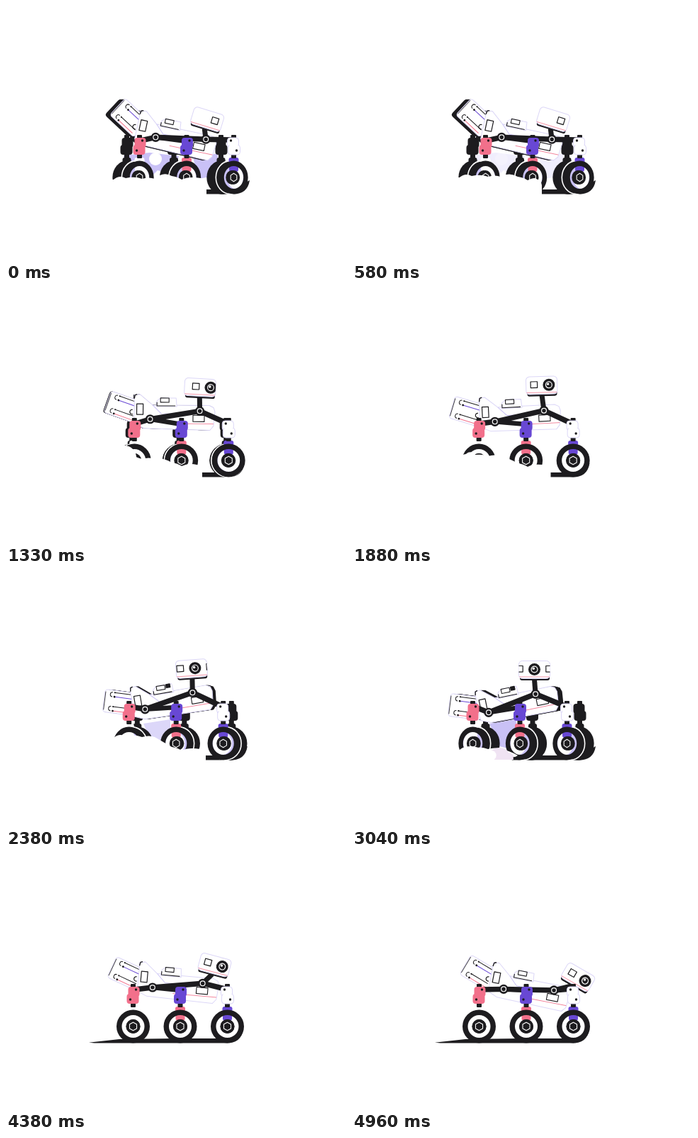
These frames come from a looping animation (480x360 px, 5 s). An HTML page with a canvas:

```html
<!DOCTYPE html>
<html lang="en">
<head>
<meta charset="utf-8">
<title>Rover</title>
<style>
  html, body { margin: 0; width: 100%; height: 100%; overflow: hidden; background: #fff; }
  canvas { display: block; width: 480px; height: 360px; }
</style>
</head>
<body>
<canvas id="stage" width="480" height="360"></canvas>
<script>
const c = document.getElementById('stage').getContext('2d');
const INK = '#1d1c1f', WHITE = '#fff', LILAC = '#c9c1f6', EDGE = '#dcd7f7',
      VIOLET = '#6848d4', PINK = '#f2708b', PUFF = '#f0e3f3';
const LOOP = 5000, RAD = Math.PI / 180, WHEEL_Y = 242, LEG_Y = 198;

// time, turn, body x, body y, pitch, tail angle, head x, head y, head angle, eye offset
const POSES = [
  [600, 9, 233, 186.5, 12, 31, 284, 160.5, 17, 32],
  [1330, 1.8, 231, 179, .5, 19, 274, 139.5, 3, 15],
  [1650, 0, 231, 180, -1, 20, 270, 137.5, 0, 12],
  [2150, -.8, 230, 182, -6, 19, 265, 136, -3, 8],
  [2380, -5.8, 229, 184, -9.6, 17, 262, 137, -4, 5],
  [3040, -9, 228, 187.5, -11.7, 19, 257.5, 138.5, 0, 0],
  [3300, -2.5, 229.5, 183, -5, 19, 264, 138, 0, 6],
  [3790, 0, 230, 180, 0, 20, 273.5, 141, 2, 11],
  [4050, 0, 230, 180, 0, 20, 273.5, 141, 2, 11],
  [4750, 0, 243.5, 190, 11, 20, 319, 173, 30, 11]
];
// time, right end, top at rear wheel, top at middle wheel, left bump radius
const DUST = [
  [0, 283, 243, 243, 0],
  [580, 268, 240, 244, 0],
  [1330, 277, 239, 248, 17],
  [2380, 282, 232, 250, 0],
  [2750, 270, 240, 253, 0],
  [3040, 226, 249, 262, 0],
  [3260, 110, 267, 267, 0]
];

const WHEELS = [
  { x: 179.5, leg: PINK, fork: WHITE, flip: 1 },
  { x: 246, leg: VIOLET, fork: PINK, flip: 1 },
  { x: 312.5, leg: WHITE, fork: VIOLET, flip: -1 }
];

// Monotone cubic interpolation through the rows
function sample(rows, t) {
  const last = rows.length - 1;
  if (t <= rows[0][0]) return rows[0].slice(1);
  if (t >= rows[last][0]) return rows[last].slice(1);
  const i = rows.findIndex((r, k) => t < rows[k + 1][0]);
  const slope = (k, j) => k < 0 || k >= last ? 0 :
    (rows[k + 1][j] - rows[k][j]) / (rows[k + 1][0] - rows[k][0]);
  const tangent = (k, j) => {
    const a = slope(k - 1, j), b = slope(k, j);
    return a * b > 0 ? 2 * a * b / (a + b) : 0;
  };
  const h = rows[i + 1][0] - rows[i][0], u = (t - rows[i][0]) / h, v = 1 - u;
  return rows[i].slice(1).map((p, n) => {
    const j = n + 1, q = rows[i + 1][j];
    return p * v * v * (1 + 2 * u) + q * u * u * (3 - 2 * u) +
      h * (tangent(i, j) * u * v * v - tangent(i + 1, j) * u * u * v);
  });
}

function at(x, y, deg, draw) {
  c.save();
  c.translate(x, y);
  c.rotate(deg * RAD);
  draw();
  c.restore();
}

function paint(fill, stroke, width = 1) {
  if (fill) { c.fillStyle = fill; c.fill(); }
  if (stroke) { c.strokeStyle = stroke; c.lineWidth = width; c.stroke(); }
}

function box(x, y, w, h, r, fill, stroke, width) {
  c.beginPath();
  c.roundRect(x, y, w, h, r);
  paint(fill, stroke, width);
}

function oval(x, y, rx, ry, fill, stroke, width) {
  c.beginPath();
  c.ellipse(x, y, Math.max(rx, 0), Math.max(ry, 0), 0, 0, 7);
  paint(fill, stroke, width);
}

function line(points, color, width) {
  c.beginPath();
  points.forEach(p => c.lineTo(p[0], p[1]));
  paint(null, color, width);
}

function shape(points, fill, stroke) {
  c.beginPath();
  points.forEach(p => c.lineTo(p[0], p[1]));
  c.closePath();
  paint(fill, stroke);
}

function shadow(d) {
  const end = 312 + Math.abs(d);
  c.beginPath();
  c.moveTo(117, 264.8);
  c.lineTo(160, 260);
  c.lineTo(240, 259);
  c.lineTo(end, 259);
  c.lineTo(end + 23, 246);
  c.quadraticCurveTo(end + 20, 265.5, end, 265.5);
  c.lineTo(125, 265.5);
  paint(INK);
}

function leg(x, color, flip) {
  c.save();
  c.translate(x, LEG_Y);
  const edge = color === WHITE ? EDGE : null;
  box(-3.5, -16, 7, 6, 1, INK);
  box(-3.5, 11, 7, 6, 1, INK);
  c.scale(flip, 1);
  box(-7, -12, 16, 14, 4, color, edge);
  box(-9, -2, 17, 14, 4, color, edge);
  if (edge) box(-6, -6, 12, 12, 3, color);
  oval(4, -8, 1.7, 1.7, INK);
  oval(-4, 6, 1.7, 1.7, INK);
  c.restore();
}

function farSide(w, d, squash) {
  const x = w.x - d;
  leg(x, INK, w.flip);
  box(x - 6, 214, 12, 20, 3, INK);
  for (let k = 1; k >= .4; k -= .15) {
    oval(w.x - d * k, WHEEL_Y, 23.5 * squash, 23.5, INK);
  }
}

function nearWheel(w, d, squash) {
  const x = w.x + d, y = WHEEL_Y;
  if (Math.abs(d) > 1) {
    oval(w.x + d * .45, y, 23.6 * squash, 23.4, INK, WHITE, 1.6);
  }
  box(x - 7, 214, 14, 10, 3, w.fork);
  oval(x, y, 17 * squash, 17, Math.abs(d) > 1 ? LILAC : WHITE);
  oval(x + d * .25, y, (17 - Math.abs(d) * .45) * squash, 16, WHITE);
  box(x - 6.5, 225, 13, 9, 3, w.fork);

  c.beginPath();
  c.ellipse(x, y, 23.5 * squash, 23.5, 0, 0, 7);
  c.ellipse(x, y, 16 * squash, 16, 0, 0, 7);
  c.fillStyle = INK;
  c.fill('evenodd');

  oval(x - d * .3, y, 10 * squash, 10, INK);
  oval(x, y, 10 * squash, 10, INK);
  c.beginPath();
  for (let k = 0; k < 6; k++) {
    const a = k * Math.PI / 3;
    c.lineTo(x + Math.sin(a) * 5.8 * squash, y - Math.cos(a) * 5.8);
  }
  c.closePath();
  paint(null, WHITE, 1.1);
}

function tailLoop(y, tint) {
  line([[-10, y - 3], [18, y - 3]], INK, 1);
  line([[-10, y + 3], [18, y + 3]], tint, 1);
  c.beginPath();
  c.arc(-12, y, 3.2, Math.PI / 2, Math.PI * 1.5);
  paint(null, INK, 1);
  oval(-9, y + 3, 1.4, 1.4, INK);
  oval(-9, y - 3, 1, 1, INK);
}

const hull = [[-50, -29], [-42, -30], [-24, -15], [56, -15], [62, -12],
              [64, -6], [62, 14], [57, 20], [-36, 18], [-50, 12]];

function body(d, x, y, pitch, tail) {
  const lift = Math.max(d, 0);
  const tx = -67, ty = -11, a = pitch * RAD;
  const tailX = x + tx * Math.cos(a) - ty * Math.sin(a) + lift * .5;
  const tailY = y + tx * Math.sin(a) + ty * Math.cos(a) - lift * .45;

  // Dark side that shows when the rover turns
  if (Math.abs(d) > .5) {
    for (let k = 1; k > .1; k -= .15) {
      at(x - d * k * .8, y, pitch, () => shape(hull, INK));
      at(tailX - d * k * .8, tailY, pitch + tail, () => box(-23, -16, 46, 32, 4, INK));
    }
  }
  at(tailX, tailY, pitch + tail, () => {
    box(-23, -16, 46, 32, 4, WHITE, EDGE);
    line([[-22, 13], [-22, -13]], INK, .8);
    tailLoop(-10, VIOLET);
    tailLoop(10, PINK);
  });
  at(x, y, pitch, () => {
    shape(hull, WHITE, EDGE);
    line([[-50, -24], [-49, -29], [-46, -30]], INK, 1.4);
    line([[-24, -15], [-12, -3], [18, -3]], LILAC, 1);
    line([[0, 11], [62, 11]], PINK, .8);
    box(-46.5, -16.5, 9, 15, 0, WHITE, INK, 1.2);
    c.beginPath();
    c.arc(-53, -5, 3.2, 1.2, 4.9);
    paint(null, INK, 1.2);
    box(33, -1, 16, 9, 0, WHITE, INK, 1.1);
    shape([[-19, -13], [-18, -21], [-13, -25], [9, -25], [10, -13]], WHITE, EDGE);
    line([[-18, -19], [-18, -14], [8, -14]], INK, 1.1);
    box(-13, -25, 12, 6, 0, WHITE, INK, 1.1);
    if (d < -3) box(0, -26, 7, 6, 1, INK);
  });
}

function head(x, y, deg, eye, base) {
  const a = deg * RAD;
  line([[x - Math.sin(a) * 13, y + Math.cos(a) * 13], base], INK, 7);
  at(x, y, deg, () => {
    box(-20.5, 6, 42, 8.6, 3, INK);
    box(-22, -13, 44, 25, 5, WHITE, EDGE);
    c.save();
    c.beginPath();
    c.roundRect(-22, -13, 44, 25, 5);
    c.clip();
    line([[-22, 9.5], [22, 9.5]], PINK, .7);
    [-21, 21].forEach(side => box(eye + side - 4.7, -6, 9.4, 8.6, 0, WHITE, INK, 1.2));
    oval(eye, -1, 8.5, 8.5, INK);
    oval(eye, -1, 4.4, 4.4, INK, WHITE, 1.2);
    oval(eye - 1.2, -2.2, 1.7, 1.7, WHITE);
    c.restore();
  });
}

function rocker(d, a, b) {
  c.lineJoin = 'round';
  line([[181 + d, 190], a, b, [309 + d, 189]], INK, 7.5);
  line([a, [246 + d, 191]], INK, 6.5);
  [a, b].forEach(p => {
    oval(p[0], p[1], 6.6, 6.6, INK);
    oval(p[0], p[1], 3.4, 3.4, null, WHITE, 1.2);
  });
}

function tints(d, t) {
  if (Math.abs(d) < 2) return;
  c.save();
  c.globalAlpha = Math.abs(d) / 9 * (d > 0 ? Math.max(.25, 1 - t / 800) : 1);
  if (d > 0) {
    shape([[166, 211], [203, 207], [244, 212], [236, 238], [214, 232], [206, 240], [168, 236]], LILAC);
    shape([[264, 214], [300, 208], [294, 240], [272, 244]], LILAC);
    oval(211, 216, 9, 9, WHITE);
  } else {
    shape([[194, 214], [232, 208], [232, 252], [208, 246]], LILAC);
  }
  c.restore();
}

function dust(t) {
  const [end, rear, mid, bump] = sample(DUST, t);
  if (end < 120) return;
  c.beginPath();
  c.moveTo(90, 290);
  c.lineTo(90, rear + 3);
  c.lineTo(152, rear + 2);
  c.quadraticCurveTo(160, rear - 5, 169, rear);
  c.quadraticCurveTo(182, rear - 3, 192, rear + 1);
  if (end > 210) {
    c.quadraticCurveTo(202, rear - 2, 210, rear + 1);
    c.quadraticCurveTo(222, mid - 10, 234, mid - 3);
  }
  if (end > 250) {
    c.quadraticCurveTo(242, mid - 2, 248, mid + 2);
    c.quadraticCurveTo(258, mid - 3, end - 8, mid);
  }
  c.quadraticCurveTo(end + 1, mid + 2, end, 258);
  c.lineTo(end, 290);
  paint(WHITE);
  if (bump > .5) oval(167, 238, bump, bump, WHITE);

  const glow = Math.max(0, 1 - Math.abs(t - 3040) / 180);
  if (glow) {
    c.save();
    c.globalAlpha = glow;
    c.beginPath();
    c.rect(end - 80, 230, 82, 35);
    c.clip();
    oval(end - 18, 259, 14, 11, PUFF);
    oval(end - 5, 263, 8, 8, PUFF);
    oval(end - 32, 259, 10, 8, WHITE);
    oval(end - 58, 256, 17, 10, WHITE);
    c.restore();
  }
}

function render(t) {
  const [d, x, y, pitch, tail, hx, hy, hr, eye] = sample(POSES, t);
  const squash = Math.sqrt(1 - (d / 17.5) ** 2);
  const r = pitch * RAD;
  const pivot = (px, py) => [
    x + px * Math.cos(r) - py * Math.sin(r) + d * .85,
    y + px * Math.sin(r) + py * Math.cos(r)
  ];
  const a = pivot(-29, 5), b = pivot(41, -7);

  c.fillStyle = WHITE;
  c.fillRect(0, 0, 480, 360);
  tints(d, t);
  shadow(d);
  if (Math.abs(d) > .5) WHEELS.forEach(w => farSide(w, d, squash));
  body(d, x, y, pitch, tail);
  head(hx, hy, hr, eye, b);
  rocker(d, a, b);
  WHEELS.forEach(w => {
    nearWheel(w, d, squash);
    leg(w.x + d, w.leg, w.flip);
  });
  dust(t);
}

const start = performance.now();
function tick() {
  render((performance.now() - start) % LOOP);
  requestAnimationFrame(tick);
}
tick();
</script>
</body>
</html>
```
